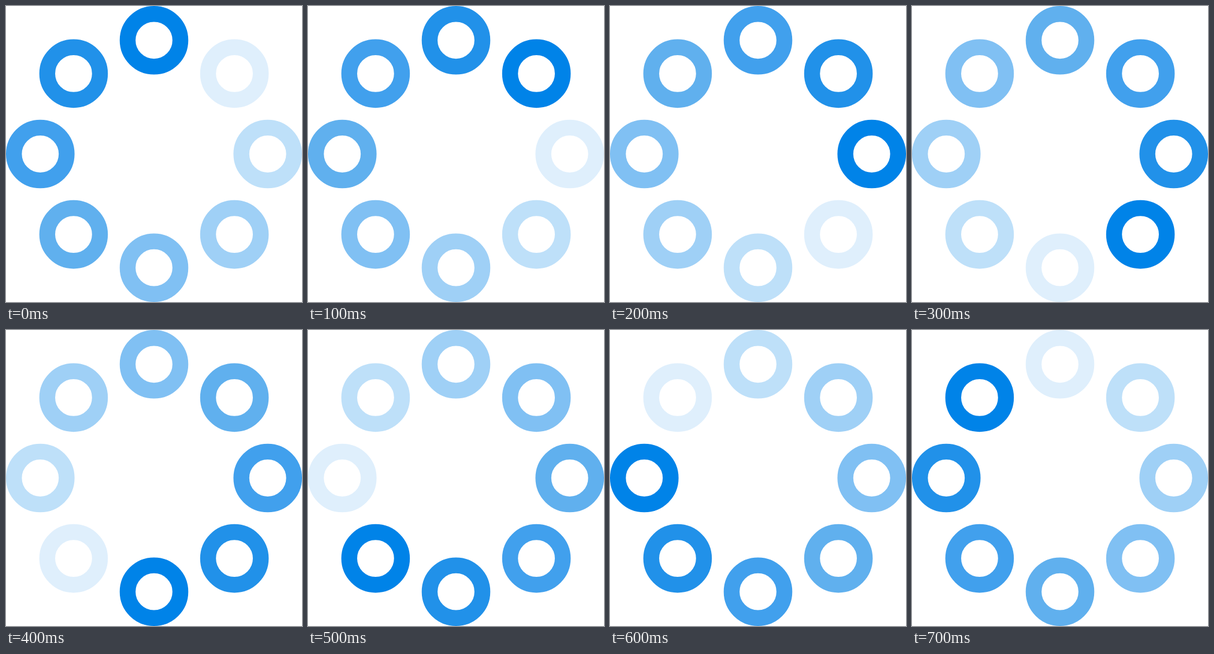
These frames come from a looping animation (512x512 px, 0.8 s). An HTML page:

```html
<!DOCTYPE html>
<html lang="en">
<head>
<meta charset="utf-8">
<title>Loading</title>
<style>
  html, body { margin: 0; width: 100%; height: 100%; overflow: hidden; background: #fff; }
  svg { display: block; width: 100%; height: 100%; }
  circle { fill: none; stroke-width: 27.4; }
</style>
</head>
<body>
<svg viewBox="0 0 512 512"></svg>
<script>
const STEP = 100;
const ORBIT = 196.7;
// Head colour first, then the fading tail
const shades = ['#0083e8', '#2191e9', '#41a0ed', '#60b0ee', '#80c0f3', '#9fd0f6', '#bee0f9', '#dfeffc'];
const count = shades.length;
const svg = document.querySelector('svg');

const rings = shades.map((_, i) => {
  const angle = i / count * 2 * Math.PI;
  const ring = document.createElementNS('http://www.w3.org/2000/svg', 'circle');
  ring.setAttribute('cx', 256 + ORBIT * Math.sin(angle));
  ring.setAttribute('cy', 256 - ORBIT * Math.cos(angle));
  ring.setAttribute('r', 45.6);
  return svg.appendChild(ring);
});

function draw(time) {
  const head = Math.floor(time / STEP) % count;
  rings.forEach((ring, i) => ring.setAttribute('stroke', shades[(head - i + count) % count]));
}

const start = performance.now();
function tick() {
  draw(performance.now() - start);
  requestAnimationFrame(tick);
}
tick();
</script>
</body>
</html>
```
